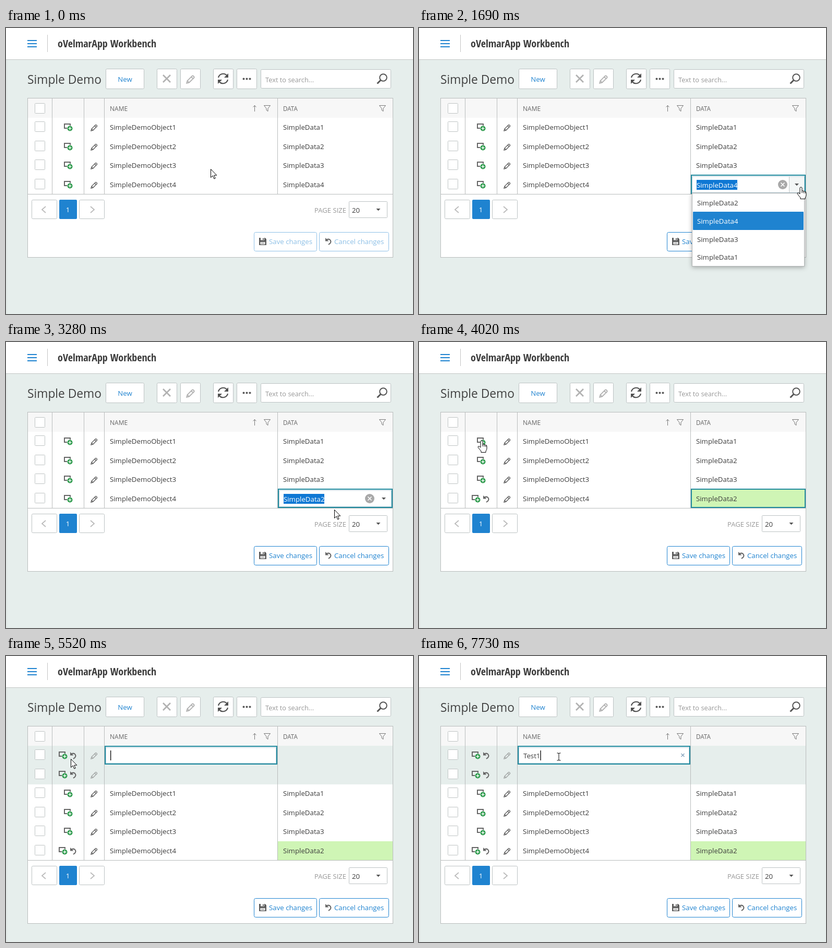
Recreate the animation shown at these times as an HTML page. Size 780 by 548 pixels, loop 8 s.

```html
<!DOCTYPE html>
<html lang="en">
<head>
<meta charset="utf-8">
<title>Batch edit grid</title>
<style>
  html, body { margin: 0; width: 100%; height: 100%; overflow: hidden; background: #e6eeec; }
  svg { display: block; font: 13.25px "Open Sans", "Noto Sans", sans-serif; fill: #3c3c3c; }
  .brand { font: bold 20px "Open Sans Condensed", "Open Sans", "Liberation Sans Narrow", sans-serif; font-stretch: 75%; }
  .line { fill: none; stroke: #666; stroke-width: 2; }
  .thin { fill: none; stroke: #777; stroke-width: 1; }
</style>
</head>
<body>
<svg id="stage" width="780" height="548" viewBox="0 0 780 548"></svg>
<script>
const LOOP = 8000, ROW = 36.6;
const BLUE = '#1f83d0', TEAL = '#218b9f', GRID = '#b9bcbc', PALE = '#e6eeec';

const rect = (x, y, w, h, fill, more = '') =>
  `<rect x="${x}" y="${y}" width="${w}" height="${h}" fill="${fill}" ${more}/>`;
const box = (x, y, w, h, stroke = '#bcc2c3', fill = '#fff', r = 2, more = '') =>
  rect(x + .5, y + .5, w - 1, h - 1, fill, `stroke="${stroke}" rx="${r}" ${more}`);
const text = (x, y, s, more = '') => `<text x="${x}" y="${y}" ${more}>${s}</text>`;
const path = (d, more = 'class="line"') => `<path d="${d}" ${more}/>`;
const group = (id, body, more = '') => `<g id="${id}" ${more}>${body}</g>`;
const at = (x, y, body, more = '') => `<g transform="translate(${x} ${y})" ${more}>${body}</g>`;
const rowY = i => Math.round(ROW * i);

const undo = path('M1 0V6.5H7.5Z', 'fill="#666"') +
  path('M3 4Q6 1.6 9.5 3.4Q13 6.6 10.2 10.5L7 13');
const pencil = path('M1 13L2 9.3L9.5 1.8Q10.3 1.2 11.2 2L12.2 3Q13 3.8 12.3 4.6L4.7 12.1ZM8 3.4L10.8 6.2M2.2 9.5L4.5 11.8',
  'fill="none" stroke="#666" stroke-width="1.5"');
const addIcon = path('M6 9H1V1H12V4') +
  '<circle cx="11.5" cy="9.5" r="5" fill="#2c9a4b"/>' +
  path('M8.5 9.5h6M11.5 6.5v6', 'stroke="#fff" stroke-width="1.5"');
const funnel = path('M.5 .5H12.5L8 6.2V11.5L5 9.3V6.2Z', 'class="thin"');
const drop = (x, y) => path(`M${x - 4} ${y - 2}h8l-4 4.2z`, 'fill="#555"');
const check = y => box(55, y, 20, 20, '#bfc4c4', '#fff', 1);

const toolbar = [
  rect(0, 0, 780, 60, '#fff'), rect(0, 60, 780, 1, '#c3c6c6'), rect(1, 61, 1, 487, '#dde4e2'),
  ...[23, 29, 35].map(y => rect(41, y, 18, 2, BLUE)),
  rect(79, 13, 1, 33, '#c4c4c4'),
  text(99, 37, 'oVelmarApp Workbench', 'class="brand"'),
  text(41, 107, 'Simple Demo', 'font-size="22.75" fill="#404040"'),
  box(191, 78, 74, 39), text(228, 103, 'New', `text-anchor="middle" fill="${BLUE}"`),
  ...[289, 334, 397, 442].map(x => box(x, 78, 39, 39)),
  path('M301 90L315 104M315 90L301 104', 'stroke="#b2b2b2" stroke-width="2.8"'),
  at(345, 89.5, `<g transform="scale(1.25)" opacity=".5">${pencil}</g>`),
  path('M407 95A9.3 9.3 0 0 1 423.5 91.5M425 99A9.3 9.3 0 0 1 408.5 102.5', 'fill="none" stroke="#505050" stroke-width="2.2"'),
  path('M426 87V95H418ZM406 107V99H414Z', 'fill="#505050"'),
  ...[455.5, 461.5, 467.5].map(x => `<circle cx="${x}" cy="97.5" r="2" fill="#555"/>`),
  box(488, 79, 250, 37),
  text(497, 104, 'Text to search...', 'font-size="12.85" fill="#999"'),
  '<circle cx="723" cy="95" r="6.8" fill="none" stroke="#555" stroke-width="2"/>',
  path('M718 100L711.5 106.5', 'stroke="#555" stroke-width="3"')
].join('');

const header = rect(42, 135, 699, 37, '#f7f7f7') + check(144) +
  text(199, 159, 'NAME', 'font-size="12" fill="#666"') +
  text(531, 159, 'DATA', 'font-size="11.7" fill="#666"') +
  path('M476.5 160V148.5M473.5 151.5L476.5 148.5L479.5 151.5', 'class="thin"') +
  at(494, 148, funnel) + at(715, 148, funnel);

const pair = at(101, 183, addIcon) + at(122, 184, undo);
const dataRow = n => group('row' + n,
  (n === 4 ? group('edited', rect(521, 172, 220, 37, '#cff5b5')) : '') + check(179) +
  (n === 4 ? group('plainIcon', at(111, 183, addIcon)) + group('pairIcon', pair) : at(111, 183, addIcon)) +
  at(162, 184, pencil) + text(199, 195, 'SimpleDemoObject' + n) +
  (n === 4 ? text(531, 195, 'SimpleData4', 'id="value"') : text(531, 195, 'SimpleData' + n)));
const newRow = n => group('new' + n, rect(42, 172, 699, 37, PALE) + check(179) + pair +
  at(162, 184, pencil, 'opacity=".5"'), `transform="translate(0 ${rowY(n)})"`);

const footer = group('footer', [
  rect(41, 318, 701, 1, GRID),
  box(49, 329, 49, 37), rect(102, 329, 34, 37, BLUE, 'rx="2"'), box(140, 329, 49, 37),
  path('M76 342L69 348L76 354M162 342L169 348L162 354', 'fill="none" stroke="#bbb" stroke-width="1.8"'),
  text(118.5, 353, '1', 'text-anchor="middle" style="fill:#fff"'),
  text(591, 353.5, 'PAGE SIZE', 'font-size="13.1" fill="#999"'),
  box(657, 332, 74, 32, '#bcc2c3', '#fff', 1), text(663, 353.5, '20'), drop(713.5, 348),
  group('actions', box(475, 391, 121, 37, BLUE, '#fff', 3) + box(600, 391, 134, 37, BLUE, '#fff', 3) +
    `<g fill="${BLUE}">${text(504, 414, 'Save changes')}${text(629, 414, 'Cancel changes')}</g>`),
  at(485, 402, path('M0 0H11.5L14 2.5V14H0Z', 'fill="#5c5c5c"') + rect(3, 0, 7, 4.5, '#fff') +
    rect(7, .8, 2, 3, '#5c5c5c') + rect(2.5, 8, 9, 4.5, '#fff') + rect(4, 9.6, 6, 1, '#5c5c5c')),
  at(611, 402, undo)
].join(''));

const lookup = group('lookup', [
  rect(521, 281, 220, 37, '#fff'),
  box(523, 284, 216, 32, '#b7cfdb', '#fff', 0),
  group('lookupHover', rect(710, 285, 28, 30, '#f3f6f6') + rect(709, 285, 1, 30, '#c4c9ca')),
  rect(532, 291, 78, 19, '#0f78d4', 'id="selection"'),
  `<svg x="532" y="284" width="149" height="32">${text(0, 21.5, '', 'id="lookupText"')}</svg>`,
  group('lookupClear', '<circle cx="697" cy="300" r="9" fill="#a9a9a9"/>' +
    path('M693.5 296.5l7 7m0-7l-7 7', 'stroke="#fff" stroke-width="1.6"')),
  drop(724, 300)
].join(''));

const popup = group('popup',
  box(523, 316, 216, 141, '#b0b4b4', '#fff', 0, 'filter="url(#shadow)"') +
  rect(525, 317, 212, 35, PALE, 'id="hover"') + rect(525, 352, 212, 35, BLUE, 'rx="1"') +
  [2, 4, 3, 1].map((n, i) => text(533, Math.round(340 + 34.8 * i), 'SimpleData' + n,
    n === 4 ? 'style="fill:#fff"' : '')).join(''));

const nameEditor = group('nameEditor',
  rect(190, 173, 329, 34, '#fff', `stroke="${TEAL}" stroke-width="2"`) +
  box(191, 175, 327, 31, '#b7cfdb', '#fff', 0) + text(200, 195.5, '', 'id="typed"') +
  rect(200, 181, 1.3, 19, '#000', 'id="caret"') +
  path('M502.5 187l6 6m0-6l-6 6', 'id="nameClear" stroke="#7d9cb8" stroke-width="1.2"'));

const pointers =
  group('arrow', path('M.5 .5V16.5L4.2 13L6.8 19L9.2 18L6.7 12.2H11.8Z')) +
  group('hand', path('M-2 1.5Q-2 0 0 0T2 1.5V7Q4 6 5 7.8Q7 7 8 8.8Q10 8.4 10 10.5V15Q10 18 8 20V22.5H-1V20Q-4 17 -7 12.3Q-6.5 10 -4.5 11L-2 13ZM2 7V11M5 8V11.5M8 9V12')) +
  group('beam', path('M-3.5 -7H-1L0 -6L1 -7H3.5M0 -6V6M-3.5 7H-1L0 6L1 7H3.5'));

document.getElementById('stage').innerHTML = `
  <defs><filter id="shadow" x="-10%" y="-10%" width="120%" height="125%">
    <feDropShadow dx="0" dy="2" stdDeviation="4" flood-color="#000" flood-opacity=".3"/></filter>
    <clipPath id="reveal"><rect id="revealBox" x="505" y="315" width="250" height="160"/></clipPath></defs>
  ${toolbar}${rect(41, 134, 701, 305, '#fff', 'id="panel"')}${header}
  ${newRow(0)}${newRow(1)}${[1, 2, 3, 4].map(dataRow).join('')}
  ${group('columns', '')}${footer}
  ${rect(41.5, 134.5, 700, 305, 'none', `id="frame" stroke="${GRID}"`)}
  ${lookup}${rect(522, 282, 218, 35, 'none', `id="focus" stroke="${TEAL}" stroke-width="2"`)}
  <g clip-path="url(#reveal)">${popup}</g>${nameEditor}
  <g id="pointer" fill="#fff" stroke="#000" stroke-linejoin="round">${pointers}</g>`;

const $ = id => document.getElementById(id);
const show = (id, on) => { $(id).style.display = on ? '' : 'none'; };
const move = (id, x, y) => $(id).setAttribute('transform', `translate(${x} ${y})`);
const between = (t, a, b) => t >= a && t < b;
const latest = (steps, t) => steps.reduce((found, s) => t >= s[0] ? s : found, steps[0]);

$('columns').innerHTML = [88, 149, 188, 520].map(x => rect(x, 135, 1, 183, GRID)).join('');
document.querySelectorAll('#pointer path').forEach(p => p.removeAttribute('class'));
$('beam').setAttribute('fill', 'none');

// time, x, y
const track = [
  [0, 392, 270], [330, 392, 270], [810, 678, 304], [1010, 678, 304], [1400, 732, 305],
  [1690, 732, 305], [2140, 666, 331], [3160, 666, 331], [3920, 120, 189], [4770, 120, 189],
  [4920, 112, 190], [5340, 112, 190], [5520, 124, 197], [6070, 268, 193], [LOOP, 268, 193]
];
const shapes = [[0, 'arrow'], [1270, 'hand'], [1800, 'arrow'], [3900, 'hand'], [4410, 'arrow'],
  [4830, 'hand'], [5430, 'arrow'], [5800, 'beam']];
const typing = [[0, ''], [6620, 'T'], [6720, 'Te'], [6980, 'Tes'], [7140, 'Test'], [7730, 'Test1']];

function pointerAt(t) {
  const i = Math.max(1, track.findIndex(k => k[0] > t));
  const [a, x0, y0] = track[i - 1], [b, x1, y1] = track[i];
  const p = (t - a) / (b - a), e = p * p * (3 - 2 * p);
  return [Math.round(x0 + (x1 - x0) * e), Math.round(y0 + (y1 - y0) * e)];
}

function render(t) {
  const added = t < 4310 ? 0 : t < 5080 ? 1 : 2;
  const shift = rowY(added), changed = t >= 4020;
  $('panel').setAttribute('height', 305 + shift);
  $('frame').setAttribute('height', 305 + shift);
  document.querySelectorAll('#columns rect').forEach(r => r.setAttribute('height', 183 + shift));
  for (let n = 1; n <= 4; n++) move('row' + n, 0, rowY(n - 1 + added));
  show('new0', added > 0);
  show('new1', added > 1);
  move('footer', 0, shift);
  $('actions').setAttribute('opacity', t < 1010 ? .5 : 1);
  show('edited', changed);
  show('pairIcon', changed);
  show('plainIcon', !changed);
  $('value').textContent = changed ? 'SimpleData2' : 'SimpleData4';

  const [x, y] = pointerAt(t);
  const loaded = t >= 1100, picked = t >= 2500;
  const selected = loaded && !between(t, 2440, 2630);
  show('lookup', between(t, 780, 4020));
  show('focus', between(t, 780, 2440) || between(t, 2630, 4310));
  show('lookupHover', between(t, 1010, 2140) && x > 709 && y < 316);
  show('lookupClear', loaded);
  show('selection', selected);
  $('lookupText').textContent = !loaded ? '0ae4d800-e430-4c71-ab2f' : picked ? 'SimpleData2' : 'SimpleData4';
  $('lookupText').style.fill = selected ? '#fff' : '';
  show('popup', between(t, 1600, 2500));
  $('revealBox').setAttribute('height', 160 * Math.min(1, Math.max(.3, (t - 1600) / 80)));
  show('hover', y > 317 && x < 737);

  show('nameEditor', between(t, 4410, 5080) || t >= 5340);
  const word = latest(typing, t)[1];
  $('typed').textContent = word;
  $('caret').setAttribute('x', 200 + (word ? $('typed').getComputedTextLength() : 0));
  show('caret', !between(t, 6300, 6620) && !between(t, 7700, 7730));
  show('nameClear', word);

  const shape = latest(shapes, t)[1];
  ['arrow', 'hand', 'beam'].forEach(s => show(s, s === shape));
  move('pointer', x, y);
}

const start = performance.now();
function tick() {
  render((performance.now() - start) % LOOP);
  requestAnimationFrame(tick);
}
tick();
</script>
</body>
</html>
```
